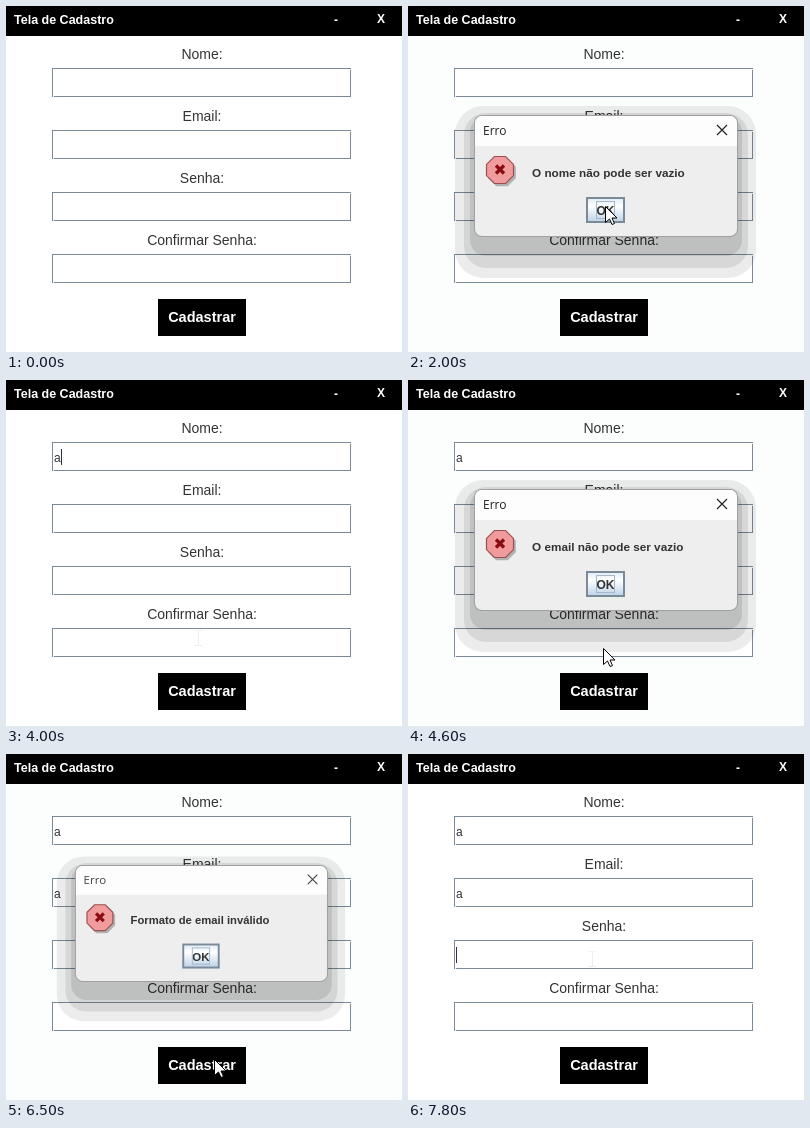
Write an HTML page with a canvas that moves like this. It is 396 px wide and 346 px high and loops after 8 s.

```html
<!DOCTYPE html>
<html lang="pt">
<head>
<meta charset="utf-8">
<title>Tela de Cadastro</title>
<style>
html, body { margin: 0; width: 100%; height: 100%; overflow: hidden; background: #fff; }
canvas { display: block; }
</style>
</head>
<body>
<canvas id="stage" width="396" height="346"></canvas>
<script>
const ctx = document.getElementById('stage').getContext('2d');
const LOOP = 8000, STEP = 100;
const SANS = '"Liberation Sans", Arial, sans-serif';
const STEEL = '#7a8a99', PALE = '#b8cfe5', FOCUS = '#a3b8cc';

const labels = ['Nome:', 'Email:', 'Senha:', 'Confirmar Senha:'];
const typed = [3700, 5800];

// start, end, field
const carets = [[2400, 2900, 0], [3400, 4200, 0], [5600, 6200, 1], [7800, 8000, 2]];
const presses = [[1100, 1200], [4300, 4500], [6200, 6300]];
const focused = [[1100, 2400], [4300, 5600], [6200, 7800]];

const dialogs = [
  { open: 1300, press: 2100, close: 2200, msg: 'O nome não pode ser vazio' },
  { open: 4500, press: 4900, close: 5000, msg: 'O email não pode ser vazio' },
  { open: 6500, press: 7100, close: 7200, msg: 'Formato de email inválido' }
];

// start, end, kind, from x, y, to x, y
const moves = [
  [200, 600, 'arrow', 86, 28, 232, 290],
  [600, 800, 'arrow', 232, 290, 217, 301],
  [1300, 1700, 'arrow', 217, 301, 203, 206],
  [1800, 1900, 'arrow', 203, 206, 197, 200],
  [2300, 2400, 'beam', 195, 180, 176, 77],
  [3600, 4000, 'beam', 176, 77, 192, 258],
  [4100, 4200, 'arrow', 192, 258, 195, 303],
  [4500, 4800, 'arrow', 195, 303, 194, 197],
  [5100, 5200, 'beam', 194, 197, 194, 197],
  [5300, 5400, 'none', 0, 0, 0, 0],
  [5400, 5500, 'beam', 193, 120, 193, 120],
  [5800, 6200, 'arrow', 193, 140, 208, 305],
  [6300, 6400, 'arrow', 208, 305, 209, 326],
  [6400, 6500, 'arrow', 209, 326, 208, 305],
  [6700, 7000, 'arrow', 208, 305, 190, 195],
  [7300, 7400, 'beam', 190, 195, 190, 195],
  [7600, 7700, 'none', 0, 0, 0, 0],
  [7800, 7900, 'beam', 184, 205, 184, 205]
];

const within = (t, spans) => spans.some(([a, b]) => t >= a && t < b);

function rect(x, y, w, h, color) {
  ctx.fillStyle = color;
  ctx.fillRect(x, y, w, h);
}

function frame(x, y, w, h, color, width = 1) {
  ctx.strokeStyle = color;
  ctx.lineWidth = width;
  ctx.strokeRect(x, y, w, h);
}

function text(str, x, y, font, color, align = 'left') {
  ctx.font = font;
  ctx.fillStyle = color;
  ctx.textAlign = align;
  ctx.fillText(str, x, y);
}

function rounded(x, y, w, h, r, color) {
  ctx.beginPath();
  ctx.roundRect(x, y, w, h, r);
  ctx.fillStyle = color;
  ctx.fill();
}

function cross(cx, cy, r, color, width) {
  ctx.beginPath();
  ctx.moveTo(cx - r, cy - r);
  ctx.lineTo(cx + r, cy + r);
  ctx.moveTo(cx + r, cy - r);
  ctx.lineTo(cx - r, cy + r);
  ctx.strokeStyle = color;
  ctx.lineWidth = width;
  ctx.stroke();
}

function octagon(cx, cy, r) {
  ctx.beginPath();
  for (let i = 0; i < 8; i++) {
    const a = (i + 0.5) * Math.PI / 4;
    ctx.lineTo(cx + r * Math.cos(a), cy + r * Math.sin(a));
  }
  ctx.closePath();
}

function drawForm(t, modal) {
  rect(0, 0, 396, 346, modal ? '#fcfdfd' : '#fff');
  rect(0, 0, 396, 30, '#000');
  text('Tela de Cadastro', 8, 18, 'bold 12.5px ' + SANS, '#fff');
  text('-', 330, 18, 'bold 12px ' + SANS, '#fff', 'center');
  text('X', 375, 17, 'bold 12px ' + SANS, '#fff', 'center');

  labels.forEach((label, i) => {
    const y = 62 + i * 62;
    text(label, 196, y - 9, '14px ' + SANS, '#333', 'center');
    rect(46, y, 299, 29, '#fff');
    frame(46.5, y + 0.5, 298, 28, STEEL);
    rect(344, y + 1, 1, 1, '#eee');
    rect(47, y + 28, 1, 1, '#eee');
    if (t >= typed[i]) text('a', 48, y + 20, '12px ' + SANS, '#333');
  });
  for (const [a, b, i] of carets) {
    if (t >= a && t < b) rect(t >= typed[i] ? 55 : 48, 69 + i * 62, 1, 16, '#333');
  }

  rect(152, 293, 88, 37, within(t, presses) ? PALE : '#000');
  text('Cadastrar', 196, 316, 'bold 14.5px ' + SANS, '#fff', 'center');
  if (!modal && within(t, focused)) frame(161.5, 302.5, 69, 18, FOCUS);
}

function drawIcon() {
  octagon(94, 166.5, 15);
  ctx.fillStyle = 'rgba(0,0,0,.25)';
  ctx.fill();
  octagon(92, 164, 14.6);
  ctx.fillStyle = '#f19c9c';
  ctx.fill();
  ctx.strokeStyle = '#9a5050';
  ctx.lineWidth = 1.2;
  ctx.stroke();
  cross(92, 163.5, 4, '#8c0c14', 3.4);
}

function drawDialog(t, d) {
  const moving = t < d.open + STEP || t >= d.close;
  const ink = moving ? '#444' : '#222';
  ctx.save();
  if (moving) {
    ctx.translate(69, 111);
    ctx.scale(0.958, 0.958);
    ctx.translate(-66, -109);
  }
  rounded(47, 100, 301, 172, 28, 'rgba(0,0,0,.075)');
  rounded(56, 107, 284, 155, 22, 'rgba(0,0,0,.09)');
  rounded(62, 110, 272, 140, 16, 'rgba(0,0,0,.1)');
  rounded(66, 109, 264, 122, 8, '#a0a0a0');
  rounded(67, 110, 262, 120, 7, '#eee');
  rounded(67, 110, 262, 30, [7, 7, 0, 0], '#fdfdfd');
  text('Erro', 75, 129, '12px "Open Sans", sans-serif', ink);
  cross(314, 124, 5, ink, 1.2);
  drawIcon();
  text(d.msg, 124, 171, 'bold 11.75px ' + SANS, '#333');

  if (t >= d.press && t < d.close) {
    rect(178, 191, 39, 26, PALE);
  } else {
    const g = ctx.createLinearGradient(0, 191, 0, 217);
    g.addColorStop(0, '#dde8f3');
    g.addColorStop(0.35, '#fff');
    g.addColorStop(1, PALE);
    rect(178, 191, 39, 26, g);
  }
  frame(179, 192, 37, 24, STEEL, 2);
  text('OK', 197.5, 209, 'bold 12px ' + SANS, '#333', 'center');
  frame(188.5, 195.5, 18, 17, FOCUS);
  ctx.restore();
}

function drawArrow(x, y) {
  ctx.save();
  ctx.translate(x + 0.5, y + 0.5);
  ctx.beginPath();
  for (const [px, py] of [[0, 0], [0, 16], [4, 12.5], [6.5, 18], [9, 17], [6.5, 11.5], [11.5, 11.5]]) {
    ctx.lineTo(px, py);
  }
  ctx.closePath();
  ctx.fillStyle = '#fff';
  ctx.fill();
  ctx.strokeStyle = '#000';
  ctx.lineWidth = 1;
  ctx.stroke();
  ctx.restore();
}

function drawBeam(x, y) {
  rect(x, y - 8, 1, 16, '#eee');
  rect(x - 4, y - 8, 8, 1, '#f3f3f3');
  rect(x - 4, y + 7, 8, 1, '#eee');
}

function drawPointer(t) {
  const move = moves.findLast(m => t >= m[0]);
  if (!move) return;
  const [a, b, kind, x0, y0, x1, y1] = move;
  const k = Math.min(1, (t - a) / (b - a));
  const x = Math.round(x0 + (x1 - x0) * k);
  const y = Math.round(y0 + (y1 - y0) * k);
  if (kind === 'arrow') drawArrow(x, y);
  if (kind === 'beam') drawBeam(x, y);
}

const start = performance.now();

function render() {
  const elapsed = Math.max(0, performance.now() - start) % LOOP;
  const t = Math.floor(elapsed / STEP) * STEP;
  const dialog = dialogs.find(d => t >= d.open && t < d.close + STEP);
  drawForm(t, Boolean(dialog));
  if (dialog) drawDialog(t, dialog);
  drawPointer(t);
  requestAnimationFrame(render);
}
render();
</script>
</body>
</html>
```
